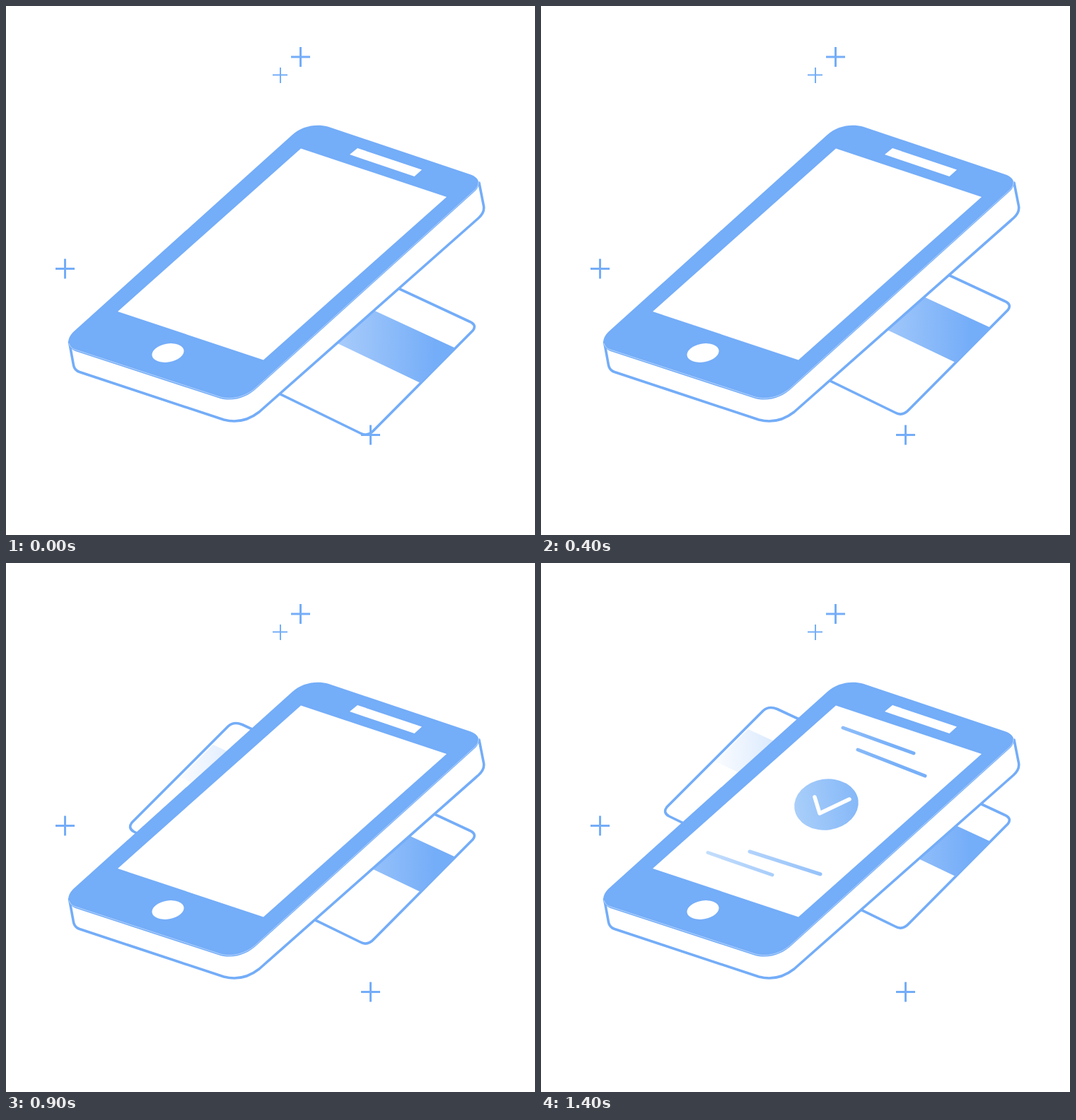
These frames come from a looping animation (748x748 px, 2100 ms). An HTML page:

```html
<!DOCTYPE html>
<html lang="en">
<head>
<meta charset="utf-8">
<title>Phone and card</title>
<style>
  html, body { margin: 0; width: 100%; height: 100%; overflow: hidden; background: #fff; }
  svg { display: block; width: 100vw; height: 100vh; }
  .line { fill: #fff; stroke: #74adf8; stroke-width: 3.6; stroke-linejoin: round; }
  .ink { fill: #74adf8; }
  .paper { fill: #fff; }
  .plus { fill: none; stroke: #74adf8; stroke-width: 3; }
  .text { fill: none; stroke: url(#textFade); stroke-width: 5; stroke-linecap: round; }
</style>
</head>
<body>
<svg viewBox="0 0 748 748">
  <defs>
    <linearGradient id="bandFade" gradientUnits="userSpaceOnUse" x1="248" y1="0" x2="608" y2="0">
      <stop stop-color="#fafcff"/><stop offset="1" stop-color="#74adf8"/>
    </linearGradient>
    <linearGradient id="textFade" gradientUnits="userSpaceOnUse" x1="230" y1="0" x2="500" y2="0">
      <stop stop-color="#c4defc"/><stop offset="1" stop-color="#78b0f8"/>
    </linearGradient>
    <linearGradient id="badgeFade">
      <stop stop-color="#a9cffa"/><stop offset="1" stop-color="#86b8f8"/>
    </linearGradient>
  </defs>

  <g id="card">
    <path class="line" d="M178 336L314 200Q322 192.6 334 197.5L655 347Q666.5 352 660 360L521 500Q511 511 501 505L181 349Q172 344 178 336Z"/>
    <path fill="url(#bandFade)" d="M293 226L636 385L586 434L247 272Z"/>
  </g>

  <path class="line" d="M89.5 475L95.500 508Q97 515 104 517.500L308 585Q335 592 358 574L668 300Q677 292 675.500 283L669 250L400 300Z"/>
  <path class="ink" d="M405 182C418 170 438 166 455 170.500L656 238C668 242 673 251 664 261L355 540C342 553 322 560 303 555L98 488C86 483 85 471 95 461Z"/>
  <path fill="none" stroke="#fff" stroke-opacity=".6" stroke-width=".8" d="M89 477Q91 484 98 486L303 553C322 558 341 551 354 539L663 260Q669 254 668 248"/>
  <path class="paper" d="M417 201.500L623 270L364 500.500L158 432ZM497 201L588 231.500L577.500 241L486 210Z"/>
  <ellipse class="paper" cx="229" cy="490.500" rx="22.800" ry="13" transform="rotate(-10 229 490.500)"/>

  <g id="content">
    <path class="text" d="M427 233L527 269M448 264L543 301M295 408L395 440M236 409.500L327 441"/>
    <ellipse fill="url(#badgeFade)" cx="403.500" cy="341.500" rx="45.500" ry="36" transform="rotate(-8 403.500 341.500)"/>
    <path fill="none" stroke="#fff" stroke-width="5.500" stroke-linecap="round" stroke-linejoin="round" d="M387 331L394 354L436 334"/>
  </g>

  <path class="plus" d="M403 72h27M416.500 58v28M70 371.500h27M83.500 357.500v28M502 606.500h27M515.500 592.500v28"/>
  <path class="plus" style="stroke-width:2" d="M377 97.500h21M388 87v22"/>
</svg>
<script>
  const LOOP = 2100, STEP = 100;
  // Distance of the card below its highest position, one value per step
  const drops = [99, 92, 85, 78, 70, 62, 54, 46, 38.5, 31, 24, 17, 9, 0, 9];
  const last = drops.length - 1;
  const card = document.getElementById('card');
  const content = document.getElementById('content');
  const start = performance.now();

  function draw() {
    const time = Math.max(0, performance.now() - start) % LOOP;
    const step = Math.min(last, Math.floor(time / STEP));
    card.setAttribute('transform', `translate(0 ${drops[step]})`);
    content.setAttribute('visibility', step === last ? 'visible' : 'hidden');
    requestAnimationFrame(draw);
  }
  draw();
</script>
</body>
</html>
```
